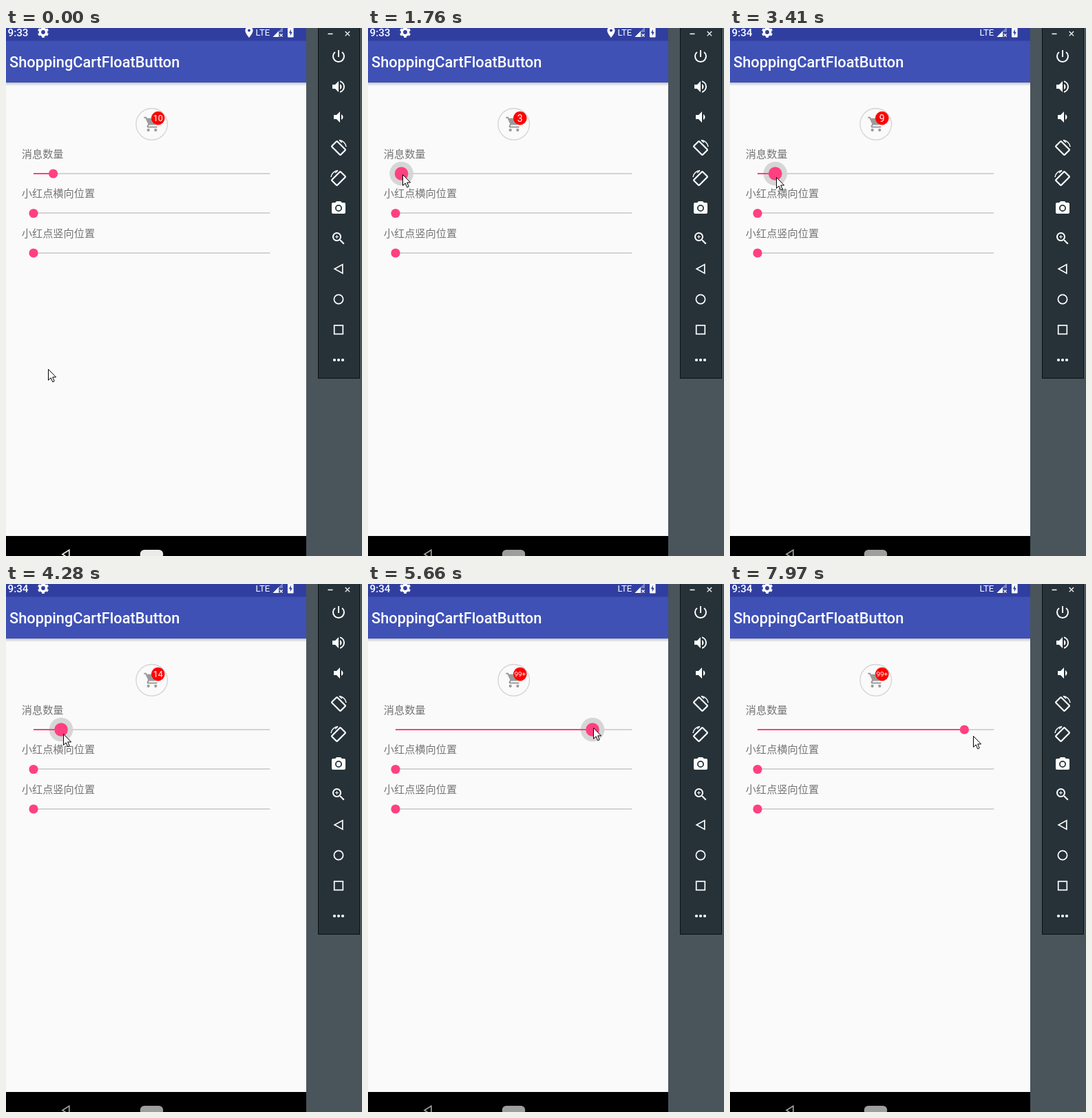
Write an HTML page that moves like this. It is 517 px wide and 765 px high and loops after 8000 ms.

```html
<!DOCTYPE html>
<html lang="zh-CN">
<head>
<meta charset="utf-8">
<title>Float button demo</title>
<style>
  html, body { margin: 0; width: 100%; height: 100%; overflow: hidden; background: #4a545b; }
  svg { display: block; width: 100vw; height: 100vh; font-family: Roboto, sans-serif; }
  .label { font: 15.2px "Noto Sans CJK SC", "Noto Sans CJK", sans-serif; fill: #757575; }
  .line { fill: none; stroke: #fff; stroke-width: 1.7; }
</style>
</head>
<body>
<svg viewBox="0 0 517 765">
  <defs>
    <linearGradient id="shade" x2="0" y2="1">
      <stop stop-color="#000" stop-opacity=".22"/>
      <stop offset="1" stop-color="#000" stop-opacity="0"/>
    </linearGradient>
    <g id="rotate" class="line">
      <rect x="-5.5" y="-9" width="11" height="18" rx="1" transform="translate(0 1) rotate(-45)" stroke-width="2.2"/>
      <path d="M1 -10.6A11 11 0 0 1 11 -1M1 -10.6L5 -7" stroke-width="1.5"/>
    </g>
  </defs>

  <rect width="517" height="765" fill="#4a545b"/>

  <!-- phone screen -->
  <rect width="436" height="765" fill="#fafafa"/>
  <rect y="79" width="436" height="5" fill="url(#shade)"/>
  <rect width="436" height="79" fill="#3f51b5"/>
  <rect width="436" height="18.5" fill="#303f9f"/>

  <g fill="#fff">
    <text id="clock" x="2.5" y="11.5" font-size="15.2" font-weight="500"></text>
    <g transform="translate(54 6)" fill="none" stroke="#fff">
      <circle r="4.6" stroke-width="3.4"/>
      <circle r="6.9" stroke-width="2.4" pathLength="12" stroke-dasharray="1 1" stroke-dashoffset="1.5"/>
    </g>
    <path id="place" transform="translate(343.4 -3.6) scale(.8)" fill-rule="evenodd"
      d="M12 2C8.13 2 5 5.13 5 9c0 5.25 7 13 7 13s7-7.75 7-13c0-3.87-3.13-7-7-7zm0 9.5a2.5 2.5 0 1 1 0-5 2.5 2.5 0 0 1 0 5z"/>
    <text x="362.6" y="11" font-size="13.1">LTE</text>
    <path d="M387.5 13L402 -1.5V6H396.5V13Z" opacity=".35"/>
    <path d="M387.5 13L396 4.5V13Z"/>
    <path d="M397.5 8.5l4.2 4.2m0-4.2l-4.2 4.2" stroke="#fff" stroke-width="1.2"/>
    <rect x="409" y="-1" width="8.6" height="14.5" rx="1"/>
    <path d="M413.8 1.5L411 7.2H412.8V11.5L415.8 5.8H413.8Z" fill="#303f9f"/>
    <text x="5" y="57" font-size="21.8" font-weight="500">ShoppingCartFloatButton</text>
  </g>

  <circle cx="211.7" cy="139.3" r="22.8" fill="#fafafa" stroke="#d3d3d3" stroke-width="1.3"/>
  <path transform="translate(199.3 126.6) scale(1.06)" fill="#9b9b9b"
    d="M7 18c-1.1 0-1.99.9-1.99 2S5.9 22 7 22s2-.9 2-2-.9-2-2-2zM1 2v2h2l3.6 7.59-1.35 2.45c-.16.28-.25.61-.25.96 0 1.1.9 2 2 2h12v-2H7.42c-.14 0-.25-.11-.25-.25l.03-.12.9-1.63h7.45c.75 0 1.41-.41 1.75-1.03l3.58-6.49A1 1 0 0 0 20 4H5.21l-.94-2H1zm16 16c-1.1 0-1.99.9-1.99 2s.89 2 1.99 2 2-.9 2-2-.9-2-2-2z"/>
  <g id="badge">
    <circle cx="220.8" cy="130.6" r="9.8" fill="#f00"/>
    <text id="count" x="220.8" text-anchor="middle" fill="#fff"></text>
  </g>

  <text class="label" x="22.8" y="187.5">消息数量</text>
  <text class="label" x="22.8" y="245">小红点横向位置</text>
  <text class="label" x="22.8" y="302.5">小红点竖向位置</text>

  <circle id="halo" cy="211" fill="#000"/>
  <g stroke="#d3d3d3" stroke-width="2">
    <path d="M40 211H383.3M40 268H383.3M40 326H383.3"/>
    <path id="fill" stroke="#ff4081"/>
  </g>
  <g fill="#ff4081">
    <circle id="thumb" cy="211"/>
    <circle cx="40" cy="268.5" r="6.6"/>
    <circle cx="40" cy="326" r="6.6"/>
  </g>

  <rect y="736" width="436" height="29" fill="#000"/>
  <g id="nav">
    <path d="M82 762.5L91.8 756.3V768.7Z" fill="none" stroke="currentColor" stroke-width="1.7"/>
    <rect x="194.8" y="756" width="33.4" height="13" rx="6" fill="currentColor"/>
  </g>

  <!-- emulator toolbar -->
  <rect x="453.5" y="-1" width="60" height="508.5" fill="#263238" stroke="#0c1113"/>
  <g class="line">
    <path d="M467.5 8.5H474.5M492.7 5l6.4 6.4m0-6.4l-6.4 6.4" stroke-width="1.3"/>
    <path d="M477.2 349L488.8 342.6V355.4Z"/>
    <circle cx="483" cy="393" r="6.6"/>
    <rect x="476.7" y="430.8" width="12.6" height="12.6"/>
    <path d="M477 481h12.1" stroke-width="4.2" stroke-linecap="round" stroke-dasharray="0 6"/>
  </g>
  <g id="icons" fill="#fff" fill-rule="evenodd"></g>
  <use href="#rotate" transform="translate(483 173)"/>
  <use href="#rotate" transform="translate(483 217) scale(-1 1)"/>

  <path id="cursor" d="M.5 .5V16.3L4.2 12.9 6.7 18.8 9.2 17.7 6.7 11.9H11.6Z" fill="#fff" stroke="#000"/>
</svg>

<script>
const LOOP = 8000, PRESS = 880, RELEASE = 6530;
const el = id => document.getElementById(id);
const set = (id, attrs) => {
  for (const k in attrs) el(id).setAttribute(k, attrs[k]);
};

// 24-unit toolbar icons, keyed by centre y
const icons = {
  41: 'M13 3h-2v10h2V3zm4.83 2.17l-1.42 1.42A7 7 0 1 1 7.58 6.58L6.17 5.17a9 9 0 1 0 11.66 0z',
  85: 'M3 9v6h4l5 5V4L7 9H3zm13.5 3c0-1.77-1.02-3.29-2.5-4.03v8.05c1.48-.73 2.5-2.25 2.5-4.02zM14 3.23v2.06a7 7 0 0 1 0 13.42v2.06a9 9 0 0 0 0-17.54z',
  129: 'M18.5 12c0-1.77-1.02-3.29-2.5-4.03v8.05c1.48-.73 2.5-2.25 2.5-4.02zM5 9v6h4l5 5V4L9 9H5z',
  261: 'M15.2 12a3.2 3.2 0 1 1-6.4 0 3.2 3.2 0 0 1 6.4 0zM9 2L7.17 4H4a2 2 0 0 0-2 2v12a2 2 0 0 0 2 2h16a2 2 0 0 0 2-2V6a2 2 0 0 0-2-2h-3.17L15 2H9zm3 15a5 5 0 1 1 0-10 5 5 0 0 1 0 10z',
  305: 'M15.5 14h-.79l-.28-.27A6.5 6.5 0 1 0 13.73 14.43l.27.28v.79l5 4.99L20.49 19l-4.99-5zm-6 0a4.5 4.5 0 1 1 0-9 4.5 4.5 0 0 1 0 9zM12 10h-2v2H9v-2H7V9h2V7h1v2h2v1z'
};
el('icons').innerHTML = Object.entries(icons)
  .map(([y, d]) => `<path d="${d}" transform="translate(471 ${y - 12})"/>`).join('');

const linear = u => u;
const easeIn = u => u ** 2.8;
const easeOut = u => 1 - (1 - u) ** 2.5;
const ramp = (t, from, to) => Math.min(1, Math.max(0, (t - from) / (to - from)));

// Pointer strokes: start, end, then the x, y and count they lead to
const rest = [61, 494, 10];
const strokes = [
  [90, 640, [68, 212, 10], linear],
  [PRESS, 1670, [51, 212, 3], linear],
  [1730, 1960, [47, 212, 0], linear],
  [2410, 2720, [60, 213, 4], easeIn],
  [3090, 3580, [71, 217, 11], linear],
  [3970, 4760, [240, 213, 48], easeIn],
  [4790, 5570, [327, 208, 100], easeOut],
  [6120, 6250, [341, 208, 105], linear],
  [RELEASE, 7020, [44, 275, 105], linear],
  [7180, 7700, [391, 250, 105], linear],
  [7700, 7970, [353, 220, 105], easeOut]
];

const pose = t => strokes.reduce((now, [from, to, goal, ease]) => {
  const k = ease(ramp(t, from, to));
  return now.map((v, i) => v + (goal[i] - v) * k);
}, rest).map(Math.round);

function draw(t) {
  const [px, py, n] = pose(t);
  const x = 40 + n * 343.3 / 120;
  const text = n > 99 ? '99+' : String(n);
  const size = [14, 12.6, 9.9][text.length - 1];
  const grip = ramp(t, PRESS, PRESS + 230) - ramp(t, RELEASE, RELEASE + 170);
  const grow = ramp(t, PRESS, PRESS + 160);
  const glow = grow - ramp(t, RELEASE, RELEASE + 450);
  const grey = Math.round(235 - 77 * ramp(t, 90, 400));

  el('count').textContent = text;
  set('count', { 'font-size': size, y: 130.7 + size * .355 });
  set('badge', { visibility: n ? 'visible' : 'hidden' });
  set('fill', { d: `M40 211H${x}` });
  set('thumb', { cx: x, r: 6.6 + 3.2 * grip });
  set('halo', { cx: x, r: 9 + 8.3 * grow, opacity: .145 * glow });

  el('clock').textContent = t < 2500 ? '9:33' : '9:34';
  set('place', { visibility: t < 1850 ? 'visible' : 'hidden' });
  set('nav', { color: `rgb(${grey},${grey},${grey})` });
  set('cursor', { transform: `translate(${px} ${py})` });
}

const start = performance.now();
function tick() {
  draw((performance.now() - start) % LOOP);
  requestAnimationFrame(tick);
}
tick();
</script>
</body>
</html>
```
